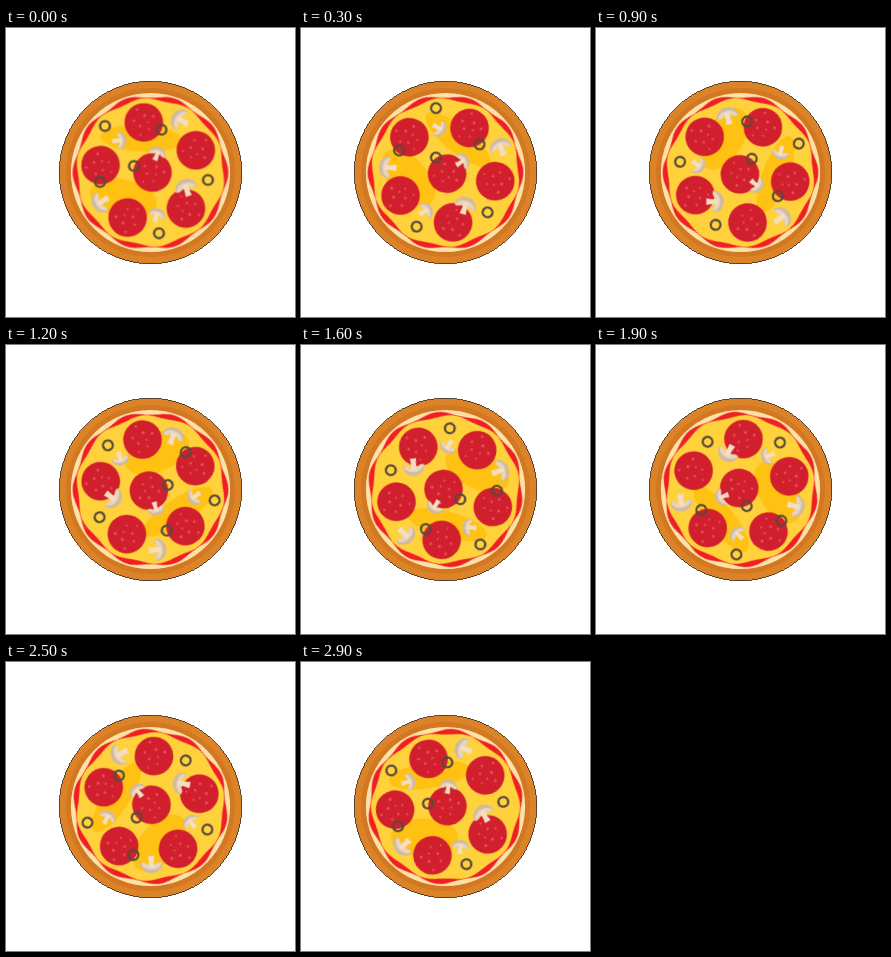
An HTML page that plays this animation: 289 by 289 pixels, repeating every 3000 ms.

```html
<!DOCTYPE html>
<html lang="en">
<head>
<meta charset="utf-8">
<title>Spinning pizza</title>
<style>
  html, body { margin: 0; width: 100%; height: 100%; overflow: hidden; background: #fff; }
  svg { display: block; width: 100vw; height: 100vh; }
  #pie { transform-origin: 0 0; animation: spin 3s steps(30) infinite; }
  @keyframes spin { to { transform: rotate(360deg); } }
</style>
</head>
<body>
<svg viewBox="0 0 289 289">
  <defs>
    <g id="pepperoni">
      <circle r="19.3" fill="#d21f2d"/>
      <g id="dots" fill="#e5525c"></g>
    </g>
    <g id="mushroom">
      <path fill="#cfbaa2" d="M2-11C-12-11-12 11 2 11Q4 8 0 3V-3Q4-8 2-11Z"/>
      <path fill="#e9d3b9" d="M2-10C-7-9-7 9 2 10Q3 7 0 3V-3Q3-7 2-10Z"/>
      <path fill="#f3dec5" d="M-3-2.5H4L9-3.2V3.2L4 2.5H-3Z"/>
    </g>
    <circle id="olive" r="4.9" fill="none" stroke="#594a3c" stroke-width="2.4"/>
  </defs>
  <g transform="translate(144.5 144.5)">
    <circle r="91.2" fill="#dc8227"/>
    <circle r="82" fill="none" stroke="#d27822" stroke-width="5"/>
    <circle r="91.3" fill="none" stroke="#1a120a" stroke-width=".7" shape-rendering="crispEdges"/>
    <circle r="79.6" fill="#fde2a5"/>
    <g id="pie">
      <path id="sauce" fill="#ee1f25"/>
      <path id="cheese" fill="#ffd23c"/>
      <g fill="#ffc112">
        <ellipse rx="34" ry="19" transform="translate(-27 26) rotate(12)"/>
        <ellipse rx="41" ry="13" transform="translate(-9 -34) rotate(3)"/>
      </g>
      <g id="toppings"></g>
    </g>
  </g>
</svg>
<script>
  const $ = id => document.getElementById(id);
  const polar = (r, deg) => {
    const a = deg * Math.PI / 180;
    return [r * Math.cos(a), r * Math.sin(a)];
  };

  function add(parent, tag, attrs) {
    const el = document.createElementNS('http://www.w3.org/2000/svg', tag);
    for (const key in attrs) el.setAttribute(key, attrs[key]);
    $(parent).append(el);
  }

  const place = (shape, x, y, turn = 0, scale = 1) => add('toppings', 'use', {
    href: '#' + shape,
    transform: `translate(${x} ${y}) rotate(${turn}) scale(${scale})`
  });

  // Closed outline with ten soft waves
  function wavy(radius, swing, turn) {
    const points = [];
    for (let deg = 0; deg < 360; deg += 3) {
      const wave = Math.cos((deg - turn) * Math.PI / 18);
      points.push(polar(radius + swing * wave, deg).map(v => v.toFixed(2)));
    }
    return `M${points.join('L')}Z`;
  }

  $('sauce').setAttribute('d', wavy(76.3, 1.6, 0));
  $('cheese').setAttribute('d', wavy(73.3, 1.3, 12));

  for (let i = 0; i < 8; i++) {
    const [cx, cy] = polar(4 + 1.5 * i, i * 137.5);
    add('dots', 'circle', { cx, cy, r: 1.1 + 0.2 * (i % 3) });
  }

  place('pepperoni', 2, 0, 30);
  for (let i = 0; i < 5; i++) place('pepperoni', ...polar(50.5, 71.5 * i - 97.6), 72 * i);

  // x, y, stem direction
  const large = [[29.5, -53, 33], [35.5, 15, 72], [-50, 30, -32]];
  const small = [[-31, -32, 176], [7, -19, 110], [6.5, 42.5, 110]];
  large.forEach(m => place('mushroom', ...m));
  small.forEach(m => place('mushroom', ...m, 0.8));

  const olives = [[-45.5, -46.5], [11, -42.8], [-16.5, -6.5], [-50.5, 9.5], [57.5, 7.5], [8.5, 60.8]];
  olives.forEach(o => place('olive', ...o));
</script>
</body>
</html>
```
